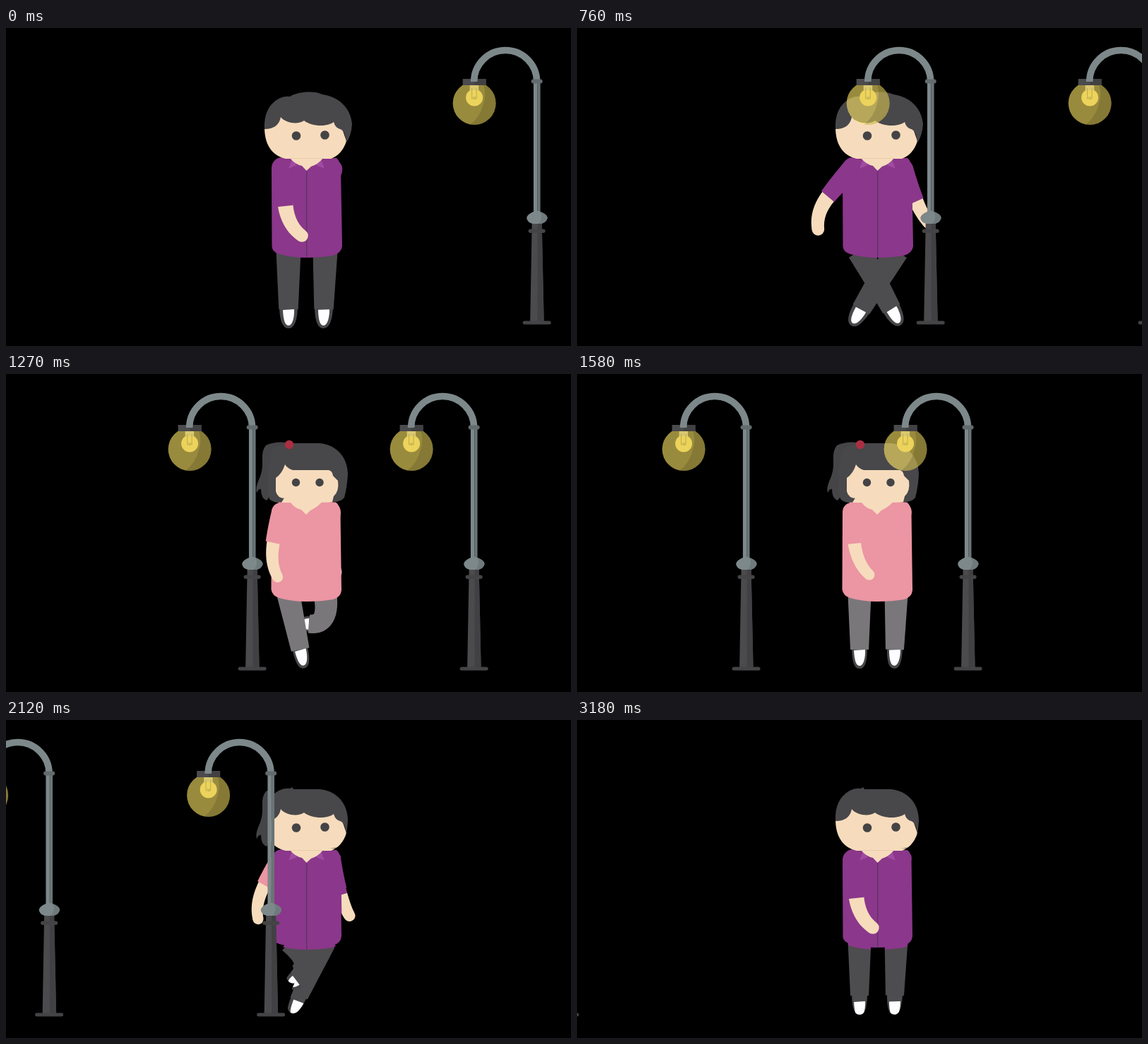
An HTML page with a canvas for the animation above (3210 ms loop, 800 px wide and 450 px high).

```html
<!DOCTYPE html>
<html lang="en">
<head>
<meta charset="utf-8">
<title>Night walk</title>
<style>
  html, body { margin: 0; width: 100%; height: 100%; overflow: hidden; background: #000; }
  canvas { display: block; width: 800px; height: 450px; }
</style>
</head>
<body>
<canvas id="stage" width="800" height="450"></canvas>
<script>
const W = 800, H = 450, LOOP = 3210, STRIDE = 1600, LAMP_GAP = 314;
const SKIN = '#f6dcbc', HAIR = '#48474a', EYE = '#444346';
const RAD = Math.PI / 180;

const lerp = (a, b, k) => a + (b - a) * k;
const swing = u => (1 - Math.cos(Math.PI * Math.min(1, u))) / 2;

// Time and x of the first lamp's pole
const LAMP_KEYS = [[0, 752], [760, 501], [1090, 399.5], [1270, 349], [1580, 240],
  [1640, 214.5], [2120, 61.5], [2640, -118.5], [3180, -331], [3210, -342]];

function lampX(t) {
  const i = LAMP_KEYS.findIndex(k => k[0] > t);
  const [t0, x0] = LAMP_KEYS[i - 1], [t1, x1] = LAMP_KEYS[i];
  return lerp(x0, x1, (t - t0) / (t1 - t0));
}

function makeLayer() {
  const c = document.createElement('canvas');
  c.width = W;
  c.height = H;
  return c.getContext('2d');
}

function fill(g, color, d) {
  g.fillStyle = color;
  g.fill(new Path2D(d));
}

function dot(g, color, x, y, r) {
  g.fillStyle = color;
  g.beginPath();
  g.arc(x, y, r, 0, 7);
  g.fill();
}

function pill(g, color, x, y, w, h, r = h / 2) {
  g.fillStyle = color;
  g.beginPath();
  g.roundRect(x, y, w, h, r);
  g.fill();
}

// Tapered band along the quadratic curve a, b, c
function limb(g, color, a, b, c, r0, r1) {
  const left = [], right = [], n = 14;
  for (let i = 0; i <= n; i++) {
    const k = i / n, q = 1 - k, r = lerp(r0, r1, k);
    const at = j => q * q * a[j] + 2 * q * k * b[j] + k * k * c[j];
    const dir = j => q * (b[j] - a[j]) + k * (c[j] - b[j]);
    const len = Math.hypot(dir(0), dir(1)) || 1;
    const nx = -dir(1) / len * r, ny = dir(0) / len * r;
    left.push([at(0) + nx, at(1) + ny]);
    right.unshift([at(0) - nx, at(1) - ny]);
  }
  g.fillStyle = color;
  g.beginPath();
  left.concat(right).forEach(p => g.lineTo(p[0], p[1]));
  g.fill();
}

function arm(g, color, pivot, angle, cuff, bend, hand, size) {
  g.save();
  g.translate(pivot[0], pivot[1]);
  g.rotate(angle * RAD);
  limb(g, SKIN, [cuff[0], cuff[1] - 8], bend, hand, 11 * size, 8.8 * size);
  dot(g, SKIN, hand[0], hand[1], 8.8 * size);
  dot(g, color, 0, 0, 15 * size);
  const mid = [cuff[0] / 2 - 1, cuff[1] / 2];
  limb(g, color, [0, 0], mid, cuff, 15 * size, 11.8 * size);
  g.restore();
}

function leg(g, look, hip, ankle, lift, knee) {
  const mid = [
    (hip[0] + ankle[0]) / 2 + lift * knee[0],
    (hip[1] + ankle[1]) / 2 + lift * knee[1]
  ];
  const dx = ankle[0] - mid[0], dy = ankle[1] - mid[1], w = look.shoe;
  g.save();
  g.translate(ankle[0], ankle[1]);
  g.rotate(Math.atan2(-dx, dy));
  g.scale(1, 1 - 0.6 * lift);
  fill(g, HAIR, `M${-w} -7C${-w} 14 -9 27 0 27S${w} 14 ${w} -7Z`);
  g.restore();
  limb(g, look.pants, hip, mid, ankle, look.thigh, look.shin);
  g.save();
  g.translate(ankle[0], ankle[1]);
  g.rotate(Math.atan2(-dx, dy));
  g.scale(1, 1 - 0.6 * lift);
  fill(g, '#fdfcff', 'M-8 1L8 0C8.500 10 6 23 0 23S-7.500 11 -8 1Z');
  g.restore();
}

function legs(g, look, pose) {
  const { step, forward } = pose;
  const up = Math.sin(Math.PI * step);
  const liftL = forward ? up : 0, liftR = forward ? 0 : up;
  const y = look.ankleY;
  leg(g, look, [452, look.hipY], [lerp(450, 402, step) - 4 * liftR, y - 40 * liftR], liftR, [20, 26]);
  leg(g, look, [400, look.hipY], [lerp(400, 446, step) - 30 * liftL, y - 40 * liftL], liftL, [42, 10]);
}

const MAN = { pants: '#4d4c4f', hipY: 316, ankleY: 398, thigh: 17.5, shin: 13.7, shoe: 13 };
const WOMAN = { pants: '#7a777a', hipY: 312, ankleY: 390, thigh: 16.5, shin: 13, shoe: 11 };

function drawMan(g, pose) {
  const shirt = '#8b378b';
  arm(g, shirt, [462, 200], 12 - 34 * pose.arms, [0, 49], [0, 68], [5, 84], 0.95);
  legs(g, MAN, pose);
  fill(g, shirt, 'M388 185Q378 188 376 204L376.500 309Q377 317 387 320Q405 325 425 325' +
    'Q446 325 463 322Q475 318 476 309L474 200Q473 188 468 184Z');
  g.fillStyle = '#5f3563';
  g.fillRect(425, 200, 1.4, 125);
  arm(g, shirt, [391, 198], 46 * pose.arms, [4, 54], [6, 80], [28, 96], 1);
  fill(g, '#a04ba2', 'M405 186L400 199L412 194ZM446 186L451 199L439 194Z');
  fill(g, SKIN, 'M402 184Q409 193 419 195L425.500 202L432 196Q442 193 449 184Z');
  fill(g, SKIN, 'M366 140C366 165 376 180 396 185H460Q476 179 482 160L470 125L385 115Z');
  g.fillStyle = '#e6cbab';
  g.fillRect(403, 184, 46, 0.8);
  fill(g, HAIR, 'M366 143C365 122 372 108 386 100Q394 96 402 97C412 90 436 88 448 94' +
    'C470 97 488 112 490 136Q489 152 482 162Q480 145 473 143Q466 141 464 133' +
    'C455 140 433 140 422 131C414 137 396 135 389 126Q386 143 366 143Z');
  dot(g, EYE, 411, 152.5, 6.3);
  dot(g, EYE, 451.5, 151.5, 6.3);
}

function drawWoman(g, pose) {
  const shirt = '#ec95a3';
  arm(g, shirt, [460, 195], 12 - 34 * pose.arms, [0, 47], [0, 70], [5, 86], 0.92);
  legs(g, WOMAN, pose);
  fill(g, '#454447', 'M398 97Q380 95 368 101Q362 108 363 122Q364 138 357 152' +
    'Q353 162 355 168Q358 162 361 163Q361 176 369 179L392 150Z');
  fill(g, HAIR, 'M376 108Q386 98 405 98H444C468 100 484 118 484 142Q483 160 479 175' +
    'Q474 181 463 181L395 182Q380 184 373 177Q366 150 376 108Z');
  fill(g, SKIN, 'M395 128Q399 134 406 136H457Q462 137 463 144L470 151Q472 166 464 173' +
    'L462 181L447 184H401L393 181L396 176Q384 176 382 166V147Q391 141 395 128Z');
  fill(g, shirt, 'M386 183Q377 186 376 198L375.500 305Q377 314 387 317Q405 322 425 322' +
    'Q446 322 463 319Q474 316 475 306L473.500 196Q472 185 467 181.500H386Z');
  arm(g, shirt, [389, 195], 46 * pose.arms, [3, 45], [6, 72], [25, 89], 0.86);
  fill(g, SKIN, 'M390 182L403 182Q409 190 418 192L425 199L431 193Q440 189 447 181.500L462 181V172H396Z');
  dot(g, '#ab2f42', 401, 100, 6.2);
  dot(g, EYE, 410.5, 153.5, 5.7);
  dot(g, EYE, 444, 153.5, 5.7);
}

function drawLamp(g, x) {
  if (x < -40 || x > 930) return;
  g.save();
  g.translate(x, 0);

  g.save();
  g.beginPath();
  g.arc(-88.5, 106.5, 30.5, 0, 7);
  g.clip();
  g.fillStyle = 'rgba(255,232,102,.6)';
  g.fillRect(-120, 75, 64, 64);
  fill(g, 'rgba(0,0,0,.13)', 'M-78 74Q-70 92 -76 108Q-80 126 -96 138H-50V74Z');
  g.restore();
  dot(g, '#ecd35c', -88.5, 98.5, 12);
  fill(g, '#d9c870', 'M-95 81H-82.500V88H-95Z');
  g.strokeStyle = '#b9a74c';
  g.lineWidth = 0.9;
  g.stroke(new Path2D('M-92 85V100H-90M-85.500 85V100H-88M-90 97L-88.500 101L-87 97'));
  pill(g, '#4b4a4d', -105, 72, 33, 9, 0.5);
  g.fillStyle = '#414043';
  g.fillRect(-88, 72, 16, 9);

  g.strokeStyle = '#7d888a';
  g.lineWidth = 9.5;
  g.beginPath();
  g.moveTo(-89, 73);
  g.arc(-44.5, 76, 44.5, Math.PI, 0);
  g.stroke();
  g.fillStyle = '#7d888a';
  g.fillRect(-4.7, 75, 5.4, 188);
  g.fillStyle = '#697476';
  g.fillRect(0.7, 75, 4.2, 188);
  pill(g, '#626b6e', -8, 72.5, 16, 6);

  fill(g, '#4b4a4c', 'M-7 276H7L10 416H-9.500Z');
  fill(g, '#414043', 'M1 276H7L10 416H1Z');
  pill(g, '#444346', -12, 284.5, 24, 5.5);
  pill(g, '#444346', -20, 414.5, 40, 5);
  const knob = 'M-5 260Q0 257 5 260Q15 264 15 268.500Q14 275 6 277H-6Q-14 275 -14.500 268.500Q-14 264 -5 260Z';
  fill(g, '#7d888a', knob);
  fill(g, '#6f7a7c', 'M4 259.500Q15 264 15 268.500Q14 275 6 277H2Q10 268 4 259.500Z');
  g.restore();
}

const stage = document.getElementById('stage').getContext('2d');
const man = makeLayer(), woman = makeLayer(), mixed = makeLayer();

function slice(layer, from, to) {
  const a = Math.max(0, from), b = Math.min(W, to);
  if (b <= a) return;
  stage.save();
  stage.beginPath();
  stage.rect(a, 0, b - a, H);
  stage.clip();
  stage.drawImage(layer.canvas, 0, 0);
  stage.restore();
}

function render(t) {
  const phase = t % STRIDE / STRIDE;
  const forward = phase < 0.5;
  const u = forward ? phase * 2 : 2 - phase * 2;
  const pose = { forward, step: swing(u), arms: swing(u * 1.06) };
  const first = lampX(t), second = first + LAMP_GAP;

  [man, woman, mixed].forEach(g => g.clearRect(0, 0, W, H));
  drawMan(man, pose);
  drawWoman(woman, pose);
  // After the second lamp the man is confined to the woman's outline
  mixed.drawImage(woman.canvas, 0, 0);
  mixed.globalCompositeOperation = 'source-in';
  mixed.drawImage(man.canvas, 0, 0);
  mixed.globalCompositeOperation = 'source-over';

  stage.fillStyle = '#000';
  stage.fillRect(0, 0, W, H);
  slice(man, 0, first);
  slice(woman, Math.max(0, first), second);
  slice(mixed, Math.max(0, second), W);
  drawLamp(stage, first);
  drawLamp(stage, second);
}

const start = performance.now();
function tick() {
  render((performance.now() - start) % LOOP);
  requestAnimationFrame(tick);
}
tick();
</script>
</body>
</html>
```
